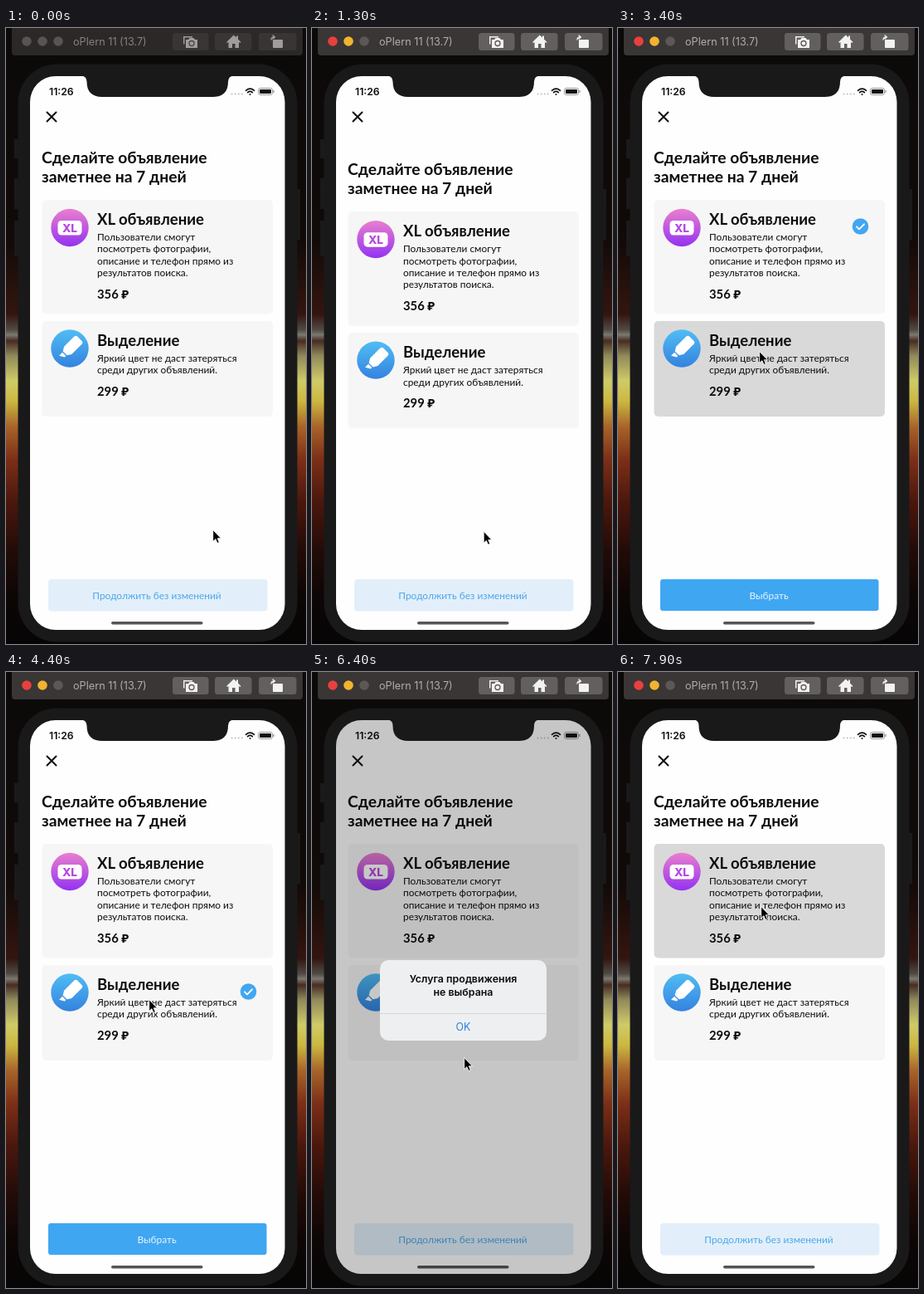
An HTML page for the animation above (8 s loop, 362 px wide and 742 px high).

```html
<!DOCTYPE html>
<html lang="ru">
<head>
<meta charset="utf-8">
<style>
html, body { margin: 0; width: 100%; height: 100%; overflow: hidden; background: #090807; }
svg { display: block; }
text { font-family: Lato, "Noto Sans", sans-serif; fill: #0c0c0e; }
.sys { font-family: Inter, "Noto Sans", sans-serif; }
.h1 { font-size: 19.3px; font-weight: 700; }
.h2 { font-size: 18.5px; font-weight: 700; }
.body { font-size: 11.9px; }
.price { font-size: 14.8px; font-weight: 700; }
.mid { text-anchor: middle; }
.line { fill: none; stroke-linecap: round; stroke-linejoin: round; }
</style>
</head>
<body>
<svg width="362" height="742" viewBox="0 0 362 742">
  <defs>
    <linearGradient id="wall" x2="0" y2="1">
      <stop offset="0" stop-color="#0b0a09"/><stop offset=".34" stop-color="#100a08"/>
      <stop offset=".465" stop-color="#34150f"/><stop offset=".49" stop-color="#504a45"/>
      <stop offset=".498" stop-color="#7c786e"/><stop offset=".508" stop-color="#472c22"/>
      <stop offset=".532" stop-color="#8f895a"/><stop offset=".573" stop-color="#d0cb68"/>
      <stop offset=".606" stop-color="#cbb840"/><stop offset=".647" stop-color="#a8642a"/>
      <stop offset=".7" stop-color="#7c2f17"/><stop offset=".77" stop-color="#4a170d"/>
      <stop offset=".85" stop-color="#220b07"/><stop offset=".92" stop-color="#0d0605"/>
      <stop offset="1" stop-color="#060505"/>
    </linearGradient>
    <linearGradient id="pink" x2="0" y2="1"><stop stop-color="#ea7fce"/><stop offset="1" stop-color="#9432f2"/></linearGradient>
    <linearGradient id="blue" x2="0" y2="1"><stop stop-color="#50bdf4"/><stop offset="1" stop-color="#3482df"/></linearGradient>
    <clipPath id="screen"><rect x="29" y="58" width="307.500" height="667" rx="31"/></clipPath>
  </defs>

  <rect width="362" height="742" fill="url(#wall)"/>

  <g id="bar">
    <path id="barBg" d="M7 0H358V29Q358 33 354 33H11Q7 33 7 29Z"/>
    <circle class="lamp" cx="25" cy="16" r="5.800"/>
    <circle class="lamp" cx="44" cy="16" r="5.800"/>
    <circle class="lamp" cx="63" cy="16" r="5.800"/>
    <text id="barText" class="sys" x="81" y="21" font-size="12.700">oPlern 11 (13.7)</text>
    <g id="keys">
      <rect x="201" y="6" width="43.500" height="21" rx="3.500"/>
      <rect x="252" y="6" width="44.500" height="21" rx="3.500"/>
      <rect x="305" y="6" width="45.500" height="21" rx="3.500"/>
    </g>
    <g id="glyphs" fill="#f2f2f2">
      <path d="M214 10h11v1.500h-9.500v8h-1.500z"/>
      <path d="M217 14h3l1.500-2h5l1.500 2h3v10h-14z"/>
      <circle cx="224" cy="18.500" r="3" fill="none" stroke="#5c5958" stroke-width="1.300"/>
      <path d="M266 17l8.800-8.500 3.200 3v-2h2v4l3.500 3.500-1 1-1.500-1v7h-4.500v-5h-3.500v5h-4.500v-7l-1.500 1z"/>
      <rect x="322" y="14" width="12" height="10" rx="1"/>
      <path class="line" d="M320 14q0-3 4-3m-2-2l2.500 2-2.500 2" stroke="#f2f2f2" stroke-width="1.300"/>
    </g>
  </g>

  <path d="M10 134h5v23h-5zM10 181h5v37h-5zM10 232h5v43h-5zM351 194h4v61h-4z" fill="#1b1a1a"/>
  <rect x="14.500" y="43.500" width="337" height="696" rx="47" fill="#19191a"/>

  <g clip-path="url(#screen)">
    <rect x="29" y="58" width="308" height="667" fill="#fefefe"/>
    <g id="page">
      <text class="h1" x="43" y="163">Сделайте объявление</text>
      <text class="h1" x="43" y="186">заметнее на 7 дней</text>
      <g id="cards"></g>
    </g>
    <path class="line" d="M49.500 101.500l11 11m0-11l-11 11" stroke="#111" stroke-width="2"/>
    <text class="sys" x="52" y="81" font-size="12.200" font-weight="600">11:26</text>
    <path class="line" d="M272.500 79.500h13" stroke="#c2c2c2" stroke-width="2" stroke-dasharray=".1 4"/>
    <g class="line" stroke="#111" stroke-width="1.700">
      <path d="M289.500 75.300q5-4.400 10 0M291.600 77.700q2.900-2.500 5.800 0"/>
      <path d="M294.500 80v.1" stroke-width="2"/>
    </g>
    <rect x="304.500" y="72.500" width="17" height="8" rx="2.300" fill="none" stroke="#999"/>
    <rect x="306" y="74" width="14" height="5" rx="1" fill="#111"/>
    <path d="M323 75v3" stroke="#999" stroke-width="1.300"/>
    <g id="skip">
      <rect x="51" y="664" width="264.500" height="38.500" rx="4" fill="#e2effa"/>
      <text class="body mid" x="182" y="688" style="fill:#4ca7ea">Продолжить без изменений</text>
    </g>
    <g id="choose">
      <rect x="51" y="664" width="263.500" height="38" rx="3" fill="#3fa6f2"/>
      <text class="body mid" x="182" y="688" style="fill:#e8f5ff">Выбрать</text>
    </g>
    <rect x="127" y="715" width="110.500" height="3.500" rx="1.750" fill="#555"/>
    <rect id="shade" x="29" y="58" width="308" height="667" fill="#000"/>
    <g id="alert">
      <rect x="82" y="347" width="201" height="97" rx="10.500" fill="#eeeff0"/>
      <path d="M82 411.500h201" stroke="#cfd0d2" stroke-width=".8"/>
      <g class="mid" font-size="12.400">
        <text class="sys" x="182.500" y="374" font-weight="600">Услуга продвижения</text>
        <text class="sys" x="182.500" y="390" font-weight="600">не выбрана</text>
        <text class="sys" x="182.500" y="432" style="fill:#2f7fe2">OK</text>
      </g>
    </g>
  </g>
  <path d="M89 57q8.500 .500 8.500 7.500q0 18.500 18.500 18.500H249.500q18.500 0 18.500-18.500q0-7 8.500-7.500z" fill="#19191a"/>
  <path id="cursor" d="M.7 .5v14l3.200-2.800 2.100 4.800 2.300-1-2-4.700h4.200z" fill="#000" stroke="#fff" stroke-width=".9"/>
</svg>

<script>
const LOOP = 8000, STEP = 100;
const $ = id => document.getElementById(id);

const xlIcon = `<circle cx="77" cy="240.500" r="22.700" fill="url(#pink)"/>
  <rect x="62.500" y="232" width="29" height="17.500" rx="4.500" fill="#fff"/>
  <text class="sys mid" x="77" y="245.700" font-size="13.700" font-weight="800" style="fill:#b848e2">XL</text>`;
const penIcon = `<circle cx="77" cy="386" r="22.700" fill="url(#blue)"/>
  <g transform="translate(77.500 385.500) rotate(45)" fill="#fff">
    <path d="M-6.500-13q0-3 3-3h7q3 0 3 3V4l-3 5h-7l-3-5z"/>
    <path d="M-3 10.300h6v2.200l-6 3.500z"/>
  </g>`;

function card(y, h, icon, title, lines, price) {
  const rowY = i => y + 49 + i * 14.4;
  const body = lines.map((s, i) => `<text class="body" x="110" y="${rowY(i)}">${s}</text>`).join('');
  $('cards').insertAdjacentHTML('beforeend', `<g>
    <rect class="bg" x="43.500" y="${y}" width="278.500" height="${h}" rx="5"/>${icon}
    <text class="h2" x="110" y="${y + 29.5}">${title}</text>${body}
    <text class="price" x="110" y="${rowY(lines.length) + 12.4}">${price}</text>
    <g class="tick"><circle cx="292.500" cy="${y + 32}" r="9.800" fill="#42a6f1"/>
    <path class="line" d="M288 ${y + 32.3}l3 3 6-6" stroke="#fff" stroke-width="1.800"/></g></g>`);
}
card(207, 137.5, xlIcon, 'XL объявление',
  ['Пользователи смогут', 'посмотреть фотографии,', 'описание и телефон прямо из', 'результатов поиска.'], '356 ₽');
card(353, 115, penIcon, 'Выделение',
  ['Яркий цвет не даст затеряться', 'среди других объявлений.'], '299 ₽');

// pointer stops: time, x, y
const path = [[0, 249, 604], [300, 226, 572], [900, 216, 678], [1100, 216, 680], [1800, 168, 306],
  [2000, 167, 303], [2600, 168, 302], [3200, 170, 390], [3400, 170, 389], [3600, 170, 388],
  [4000, 171, 290], [4200, 171, 290], [4400, 172, 394], [4800, 172, 394], [5300, 174, 617],
  [5600, 175, 680], [5900, 175, 680], [6400, 183, 464], [6600, 183, 430], [6900, 183, 428],
  [7500, 172, 284], [7900, 172, 282]];
const press = [[[1900, 2300], [4000, 4200], [7700, 8000]], [[3300, 3500], [4600, 4700]]];
const ticked = [[[2300, 4200]], [[3500, 4700]]];

const ramp = (t, a, b) => Math.min(1, Math.max(0, (t - a) / (b - a)));
const ease = k => k * k * (3 - 2 * k);
const during = (spans, t) => spans.some(([a, b]) => t >= a && t < b);

function pointer(t) {
  let i = 0;
  while (i < path.length - 2 && t >= path[i + 1][0]) i++;
  const [a, x, y] = path[i], [b, u, v] = path[i + 1], k = ease(ramp(t, a, b));
  return [x + (u - x) * k, y + (v - y) * k];
}

function scroll(t) {
  if (t < 1000) return 58 * ease(ramp(t, 300, 800));
  const s = (t - 1000) / 110;
  return t < 1800 ? 58 * (1 + s) * Math.exp(-s) : 0;
}

function setBar(on) {
  const colors = on ? ['#e9403f', '#f2b42f', '#5b5857'] : ['#575453', '#575453', '#575453'];
  document.querySelectorAll('.lamp').forEach((e, i) => e.setAttribute('fill', colors[i]));
  $('barBg').setAttribute('fill', on ? '#393635' : '#2b2827');
  $('keys').setAttribute('fill', on ? '#625f5e' : '#383534');
  $('glyphs').setAttribute('opacity', on ? 1 : .55);
  $('barText').style.fill = on ? '#b0adac' : '#858280';
}

function draw(t) {
  setBar(t >= 200);
  $('cursor').setAttribute('transform', `translate(${pointer(t)})`);
  $('page').setAttribute('transform', `translate(0 ${scroll(t)})`);
  [...$('cards').children].forEach((c, i) => {
    c.querySelector('.bg').setAttribute('fill', during(press[i], t) ? '#d9d9d9' : '#f6f6f6');
    c.querySelector('.tick').setAttribute('opacity', +during(ticked[i], t));
  });
  const chosen = ticked.some(spans => during(spans, t));
  $('choose').setAttribute('opacity', +chosen);
  $('skip').setAttribute('opacity', +!chosen);
  const shown = ease(ramp(t, 5800, 6100)) * (1 - ease(ramp(t, 6700, 7000)));
  const zoom = t < 6500 ? 1.15 - .15 * shown : 1;
  $('shade').setAttribute('opacity', .22 * shown);
  $('alert').setAttribute('opacity', shown);
  $('alert').setAttribute('transform', `translate(182.500 395.500) scale(${zoom}) translate(-182.500 -395.500)`);
}

const start = performance.now();
function tick() {
  const t = (performance.now() - start) % LOOP;
  draw(Math.floor(t / STEP) * STEP);
  requestAnimationFrame(tick);
}
tick();
</script>
</body>
</html>
```
